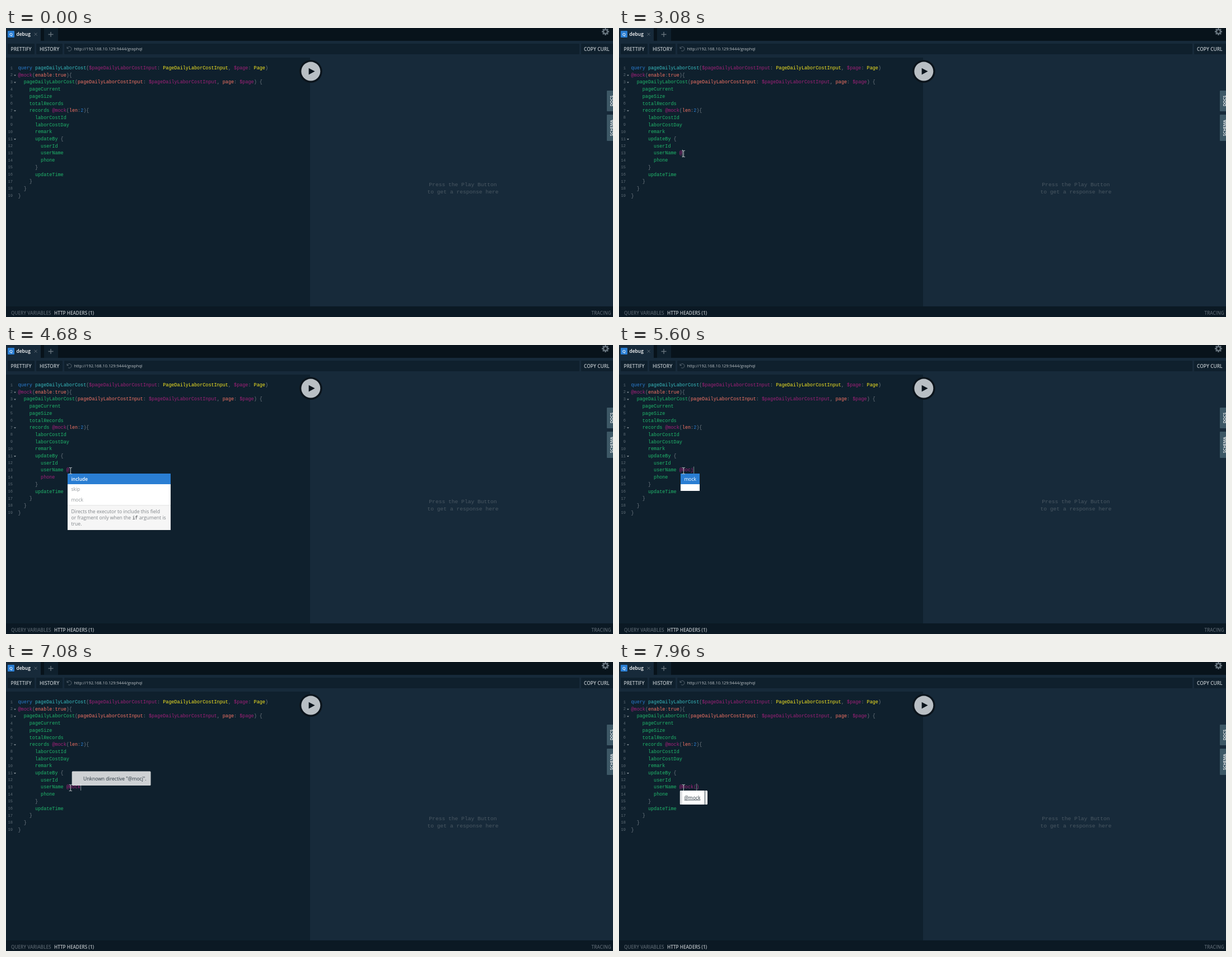
An HTML page for the animation above (8000 ms loop, 1084 by 517 pixels).

```html
<!DOCTYPE html>
<html lang="en">
<head>
<meta charset="utf-8">
<title>debug</title>
<style>
  html, body { margin: 0; width: 100%; height: 100%; overflow: hidden; background: #172a3a; }
  svg { display: block; }
  text { white-space: pre; font: 8.44px "Open Sans", sans-serif; }
  .b { font-weight: 600; }
  .ui { font-weight: 600; fill: #bcc3c8; }
  .url { font-size: 7.4px; fill: #b9bfc4; }
  .foot { font-size: 8.2px; font-weight: 600; }
  .side { font-size: 7.1px; font-weight: 600; fill: #fff; text-anchor: middle; }
  .code { font-family: "Liberation Mono", monospace; font-size: 8.46px; }
  .num { font: 7.1px "Liberation Mono", monospace; fill: #5f6c76; text-anchor: end; }
  .intro { font: 9.65px "Liberation Mono", monospace; fill: #4a5863; text-anchor: middle; }
  .k { fill: #2a7ed3; } .d { fill: #38bdc1; } .v { fill: #a3207a; } .t { fill: #f9e922; }
  .f { fill: #20b86c; } .a { fill: #f77466; } .p { fill: #6f7982; } .n { fill: #2a7ed3; }
  .desc { font-size: 8.6px; fill: #808589; }
</style>
</head>
<body>
<svg width="1084" height="517" viewBox="0 0 1084 517">
  <rect width="1084" height="517" fill="#172a3a"/>

  <!-- tabs -->
  <rect width="1084" height="23" fill="#08131b"/>
  <rect width="62" height="23" fill="#172a3a"/>
  <rect x="68" width="25" height="23" fill="#0f202d"/>
  <rect x="3" y="5" width="12" height="12" rx="1" fill="#2a7ed3"/>
  <text class="b" x="9" y="13.8" fill="#fff" text-anchor="middle" style="font-size:7.5px">Q</text>
  <text class="b" x="18.5" y="14" fill="#fff">debug</text>
  <path d="M50.5 8.7l5 5m0-5l-5 5" stroke="#5a6772"/>
  <path d="M75.5 11.5h9m-4.5-4.5v9" stroke="#66727c" stroke-width="1.4"/>
  <g id="gear" transform="translate(1070.5 6.5)" fill="#65727c">
    <circle r="3.6" fill="none" stroke="#65727c" stroke-width="2.4"/>
  </g>

  <!-- toolbar -->
  <g fill="#0f202d">
    <rect x="3" y="28" width="48" height="19" rx="1"/>
    <rect x="54" y="28" width="47" height="19" rx="1"/>
    <rect x="104" y="28" width="920" height="19" rx="1"/>
    <rect x="1027" y="28" width="60" height="19" rx="1"/>
  </g>
  <text class="ui" x="8.5" y="40.5">PRETTIFY</text>
  <text class="ui" x="60" y="40.5">HISTORY</text>
  <text class="ui" x="1032" y="40.5">COPY CURL</text>
  <text class="url" x="121.5" y="40.2">http://192.168.10.129:9444/graphql</text>
  <path d="M109.5 36.2a3.8 3.8 0 1 1 1.6 4.4M109 33.6v3h3" fill="none" stroke="#5d6a75" stroke-width=".9"/>

  <!-- panes -->
  <rect y="53" width="543" height="446" fill="#0f202d"/>
  <g id="code"></g>
  <text class="intro" x="816" y="282.7">Press the Play Button</text>
  <text class="intro" x="816" y="296.3">to get a response here</text>

  <circle cx="544.3" cy="77.6" r="20.4" fill="#0b141c"/>
  <circle cx="544.3" cy="77.6" r="17" fill="#b9bfc4"/>
  <path d="M540.6 71.8l11 5.8-11 5.8z" fill="#0b141c"/>

  <g fill="#3d5866">
    <rect x="1073" y="112" width="14" height="37" rx="1"/>
    <rect x="1073" y="155" width="14" height="47" rx="1"/>
  </g>
  <text class="side" transform="translate(1083.6 130.5) rotate(-90)">DOCS</text>
  <text class="side" transform="translate(1083.6 178.7) rotate(-90)">SCHEMA</text>

  <rect y="498" width="1084" height="19" fill="#0b1924"/>
  <text class="foot" x="9" y="512.9" fill="#56626c">QUERY VARIABLES</text>
  <text class="foot" x="86" y="512.9" fill="#b9bfc4">HTTP HEADERS (1)</text>
  <text class="foot" x="1045.5" y="512.9" fill="#56626c">TRACING</text>

  <!-- typing line -->
  <text id="typed" class="code v" y="226.4"></text>
  <rect id="caret" y="217.5" width=".9" height="12.5" fill="#8e989f"/>

  <!-- completion lists -->
  <g id="hints">
    <rect x="110" y="230" width="184" height="101" fill="#fff"/>
    <rect x="110" y="230" width="184" height="19" fill="#2a7ed3"/>
    <text class="b" x="116.5" y="242.6" fill="#fff">include</text>
    <text x="116.5" y="261.4" fill="#94999c">skip</text>
    <text x="116.5" y="280.2" fill="#94999c">mock</text>
    <rect x="110" y="286.5" width="184" height="44.5" fill="#f6f6f6"/>
    <rect x="110" y="286.5" width="184" height=".7" fill="#dcdddd"/>
    <text class="desc" x="116.5" y="301">Directs the executor to include this field</text>
    <text class="desc" x="116.5" y="312.2">or fragment only when the <tspan class="code" fill="#3f4447">if</tspan> argument is</text>
    <text class="desc" x="116.5" y="323.4">true.</text>
  </g>
  <g id="hint">
    <rect x="110" y="230" width="34" height="31" fill="#fff"/>
    <rect x="110" y="230" width="34" height="19" fill="#2a7ed3"/>
    <text x="116.5" y="242.6" fill="#fff" style="font-weight:500">mock</text>
  </g>

  <!-- tooltips -->
  <g id="error">
    <rect x="117.7" y="195.4" width="140.8" height="25.6" rx="1.5" fill="#fff"/>
    <text x="138" y="211.5" fill="#2f3a43" style="font-size:8.55px">Unknown directive "@mocj".</text>
  </g>
  <g id="info">
    <rect x="108.8" y="230" width="49.2" height="25" rx="1.5" fill="#fff"/>
    <text x="116.5" y="245.6" fill="#26323c" text-decoration="underline">@mock</text>
  </g>
  <g id="overlay">
    <rect x="109" y="230" width="4" height="25" fill="#e0e2e4"/>
    <rect x="153" y="230" width="1" height="25" fill="#2b3842"/>
  </g>

  <g id="mouse" fill="none">
    <path d="M-2.6 -5.6h1.6q1 0 1 1q0 -1 1 -1h1.6M0 -5v10M-2.6 5.6h1.6q1 0 1 -1q0 1 1 1h1.6"
      stroke="#d5d9dc" stroke-width=".9"/>
  </g>
</svg>
<script>
const LOOP = 8000, CHAR = 5.077, LEFT = 21.5, ROW = 12.7, BASE = 74;
const $ = id => document.getElementById(id);
const NS = 'http://www.w3.org/2000/svg';

function add(parent, tag, attrs, text = '') {
  const el = document.createElementNS(NS, tag);
  for (const name in attrs) el.setAttribute(name, attrs[name]);
  el.textContent = text;
  return parent.appendChild(el);
}

// Each token starts with its class letter; tokens are split by "~".
const lines = [
  'kquery ~dpageDailyLaborCost~p(~v$pageDailyLaborCostInput~p: ~tPageDailyLaborCostInput~p, ~v$page~p: ~tPage~p)',
  'v@mock~p(~aenable~p:~atrue~p){',
  'f  pageDailyLaborCost~p(~apageDailyLaborCostInput~p: ~v$pageDailyLaborCostInput~p, ~apage~p: ~v$page~p) {',
  'f    pageCurrent', 'f    pageSize', 'f    totalRecords',
  'f    records ~v@mock~p(~alen~p:~n2~p){',
  'f      laborCostId', 'f      laborCostDay', 'f      remark',
  'f      updateBy ~p{',
  'f        userId', 'f        userName', 'f        phone',
  'p      }', 'f      updateTime', 'p    }', 'p  }', 'p}'
];
const folds = [1, 2, 6, 10];

const rows = lines.map((line, i) => {
  const y = BASE + i * ROW;
  add($('code'), 'text', { class: 'num', x: 12, y: y - .5 }, i + 1);
  const row = add($('code'), 'text', { class: 'code', x: LEFT, y });
  for (const token of line.split('~')) add(row, 'tspan', { class: token[0] }, token.slice(1));
  return row;
});
for (const i of folds)
  add($('code'), 'path', { d: `M14 ${BASE + i * ROW - 3}h4l-2 2.4z`, fill: '#8a949b' });
for (let a = 0; a < 360; a += 45)
  add($('gear'), 'rect', { x: -1.3, y: -6.5, width: 2.6, height: 2.6, transform: `rotate(${a})` });

const phone = rows[13].firstChild;
const typedX = LEFT + 17 * CHAR;
$('typed').setAttribute('x', typedX);

const typing = [[0, ''], [3080, '@'], [5010, '@m'], [5140, '@mo'], [5340, '@moc'],
  [5600, '@mocj'], [6740, '@moc'], [7080, '@mock'], [7890, '@mock()']];
const blinks = [1560, 2090, 2620, 3680, 4220, 4680, 5010, 6130, 6600, 7610, 7890];
const path = [[820, 99.5, 211.5], [980, 97.5, 205.5], [1220, 109.5, 217.5], [1690, 115.3, 225]];

const clamp = v => Math.max(0, Math.min(1, v));
const ramp = (t, from, to) => clamp((t - from) / (to - from));
const within = (t, from, to) => t >= from && t < to;
const show = (id, on) => $(id).style.display = on ? '' : 'none';
const mix = (a, b, k) => a + (b - a) * k;

function mouseAt(t) {
  if (t < 820) {
    const step = Math.floor((t - 70) / 68) / 11;
    const k = 1 - (1 - clamp(step)) ** 2;
    return [mix(984.5, 99.5, k), mix(497.5, 211.5, k)];
  }
  const time = Math.min(1690, 820 + Math.floor((t - 820) / 66.7) * 66.7);
  const i = Math.max(1, path.findIndex(p => p[0] >= time));
  const [a, b] = [path[i - 1], path[i]];
  const k = ramp(time, a[0], b[0]);
  return [mix(a[1], b[1], k), mix(a[2], b[2], k)];
}

function render(t) {
  const text = typing.filter(s => s[0] <= t).pop()[1];
  if ($('typed').textContent !== text) $('typed').textContent = text;
  const column = text.endsWith(')') ? text.length - 1 : text.length;
  $('caret').setAttribute('x', typedX + column * CHAR);
  show('caret', blinks.filter(b => b <= t).length % 2);
  phone.setAttribute('class', within(t, 3480, 5400) ? 'v' : 'f');

  show('hints', within(t, 3210, 5140));
  show('hint', within(t, 5140, 6740));
  $('error').style.opacity = t < 7080 ? ramp(t, 6080, 6600) * (t >= 6130) : .8 * (1 - ramp(t, 7080, 7400));
  $('info').style.opacity = ramp(t, 7420, 7830);
  show('overlay', t >= 7960);

  show('mouse', t >= 70);
  $('mouse').setAttribute('transform', `translate(${mouseAt(t)})`);
}

const start = performance.now();
function tick() {
  render((performance.now() - start) % LOOP);
  requestAnimationFrame(tick);
}
tick();
</script>
</body>
</html>
```
